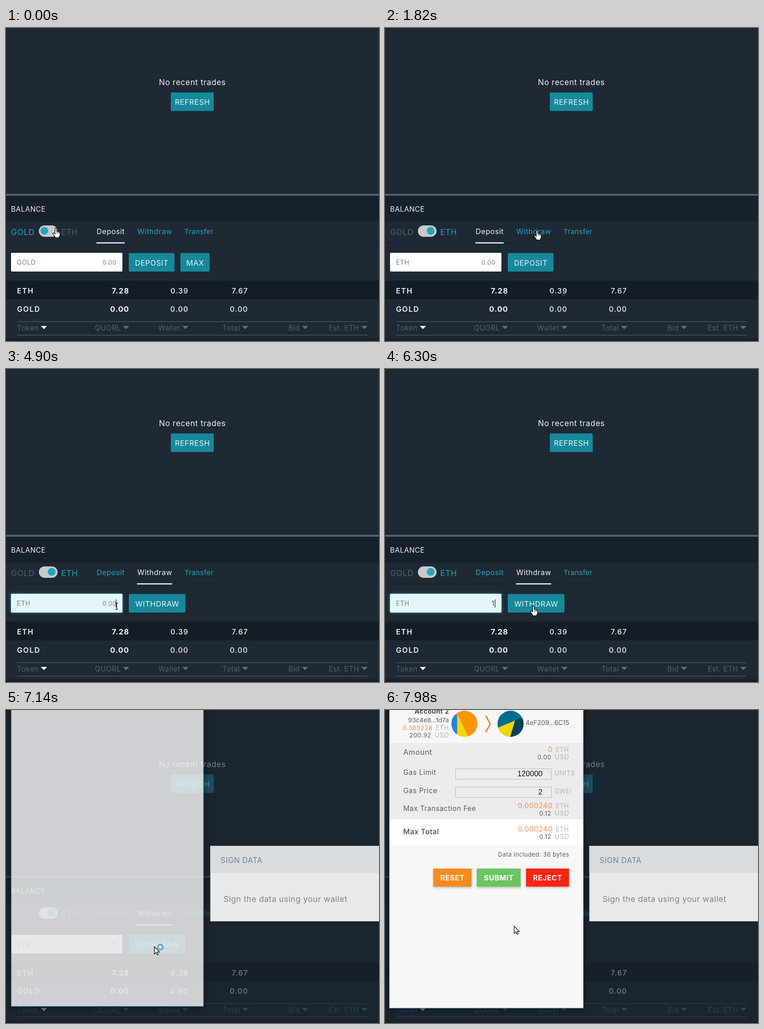
An HTML page with a canvas that plays this animation: 817 by 685 pixels, repeating every 8 s.

```html
<!DOCTYPE html>
<html lang="en">
<head>
<meta charset="utf-8">
<title>Token balance</title>
<style>
  html, body { margin: 0; width: 100%; height: 100%; overflow: hidden; background: #1e2934; }
  canvas { display: block; }
</style>
</head>
<body>
<canvas id="stage" width="817" height="685"></canvas>
<script>
const ctx = document.getElementById('stage').getContext('2d');
const LOOP = 8000, STEP = 140;
const BG = '#1e2934', DARK = '#16212b', TEAL = '#16899b', CYAN = '#22a5c4',
      MUTED = '#4d6270', LIGHT = '#eef2f4', RULE = '#4b606c';

// Times of the user's actions
const TOGGLE = 980, TAB = 2380, FOCUS = 3780, TYPED = 5740, SIGN = 6720,
      POPUP = 7140, LOADED = 7560;

const moves = [
  { from: 1120, to: 1820, a: [109, 437], b: [333, 442] },
  { from: 2800, to: 3220, a: [333, 442], b: [239, 512] },
  { from: 4060, to: 4480, a: [239, 512], b: [242, 519] },
  { from: 5740, to: 6300, a: [242, 519], b: [325, 518] },
  { from: 7700, to: 7980, a: [326, 518], b: [283, 473] }
];

const HAND = new Path2D('M-1.6 2Q0-1 1.8 2V8Q3.6 6.6 4.8 8.6Q6.5 7.4 7.5 9.4Q9.4 9 9.4 11.4V15' +
  'Q9 18 7.4 19.5V22H-1.6V20Q-4 17-6.5 13Q-5.4 10.5-3 12.6L-1.6 14Z');
const ARROW = new Path2D('M0 0V16L3.7 12.6L6.2 18L8.8 16.9L6.4 11.6H11.3Z');

function rect(x, y, w, h, color) {
  ctx.fillStyle = color;
  ctx.fillRect(x, y, w, h);
}

function round(x, y, w, h, r, color) {
  ctx.fillStyle = color;
  ctx.beginPath();
  ctx.roundRect(x, y, w, h, r);
  ctx.fill();
}

function disc(x, y, r, color) {
  ctx.fillStyle = color;
  ctx.beginPath();
  ctx.arc(x, y, r, 0, Math.PI * 2);
  ctx.fill();
}

function poly(points, color) {
  ctx.fillStyle = color;
  ctx.beginPath();
  points.forEach(([x, y]) => ctx.lineTo(x, y));
  ctx.closePath();
  ctx.fill();
}

function text(str, x, y, size, color, { align = 'left', weight = 400, gap = size * 0.035 } = {}) {
  ctx.font = `${weight} ${size}px Inter, sans-serif`;
  ctx.letterSpacing = gap + 'px';
  ctx.textAlign = align;
  ctx.fillStyle = color;
  // Half of the trailing gap keeps centred text centred
  ctx.fillText(str, x + (align === 'center' ? gap / 2 : 0), y);
}

const right = { align: 'right' }, center = { align: 'center' };

function button(label, x, y, w) {
  round(x, y, w, 40.5, 2, TEAL);
  text(label, x + w / 2, y + 27, 16.3, LIGHT, center);
}

function drawToggle(t) {
  const eth = t >= TOGGLE;
  text('GOLD', 11, 453, 17.5, eth ? MUTED : CYAN);
  text('ETH', 121, 453, 17.5, eth ? CYAN : MUTED);
  round(72, 432, 41, 25, 12.5, '#c9c9c7');
  const k = Math.min(1, Math.max(0, (t - TOGGLE + STEP) / (2 * STEP)));
  disc(84 + 16 * k, 444, 8.5, CYAN);
}

function drawTabs(active) {
  [['Deposit', 198, 62], ['Withdraw', 287, 77], ['Transfer', 391, 63]].forEach(([name, x, w], i) => {
    const on = i === active;
    text(name, x + w / 2, 451, i === 2 ? 15 : 16, on ? LIGHT : CYAN, center);
    if (on) rect(x, 469, w, 2.5, '#f4f6f6');
  });
}

function drawInput(t) {
  const focused = t >= FOCUS && t < SIGN;
  if (focused) {
    ctx.save();
    ctx.shadowColor = 'rgba(42,165,198,.6)';
    ctx.shadowBlur = 6;
    round(10.5, 491.5, 245, 42, 2.5, '#2a8ea6');
    ctx.restore();
  }
  round(11, 492, 244, 41, 2, focused ? '#e3f6f9' : '#ffffff');
  text(t >= TOGGLE ? 'ETH' : 'GOLD', 24, 518, 14, '#6b8088');
  if (t >= TYPED) text('1', 240, 518, 14.5, '#44545b', right);
  else text('0.00', 242, 518, 13.5, '#74868c', right);
  const caret = focused && (t < 4340 || (t >= 4760 && t < 5320) || t >= TYPED);
  if (caret) rect(240.5, 504, 1.2, 18, '#111');
}

function drawTable() {
  rect(0, 553, 817, 41, '#141d26');
  const number = (weight, gap) => ({ align: 'right', weight, gap });
  [['ETH', '7.28', '0.39', '7.67', 581], ['GOLD', '0.00', '0.00', '0.00', 621]].forEach(
    ([name, held, wallet, total, y]) => {
      text(name, 24, y, 16, LIGHT, { weight: 600, gap: 1.6 });
      text(held, 270, y, 16.5, LIGHT, number(700, 1));
      text(wallet, 400, y, 16, LIGHT, number(500, 1.3));
      text(total, 530.5, y, 16, LIGHT, number(500, 1.3));
    });
  rect(24, 642, 768, 1.2, RULE);
  rect(24, 671.5, 768, 1.2, RULE);
  [['Token', 71], ['QUORL', 251], ['Wallet', 381], ['Total', 512], ['Bid', 643], ['Est. ETH', 773]].forEach(
    ([name, x], i) => {
      text(name, x + 0.5, 662, 15.5, MUTED, right);
      poly([[x + 5, 652], [x + 19, 652], [x + 12, 659]], i ? '#5b717e' : '#ffffff');
    });
  rect(0, 679, 817, 6, DARK);
}

function drawPage(t) {
  rect(0, 0, 817, 685, BG);
  text('No recent trades', 408, 125, 17.3, LIGHT, center);
  button('REFRESH', 361, 141, 94);
  rect(0, 363, 817, 4, '#50656f');
  rect(0, 367, 817, 57, DARK);
  text('BALANCE', 11, 402, 15.4, LIGHT);
  rect(0, 469.5, 817, 1.5, '#17222c');
  drawToggle(t);
  drawTabs(t >= TAB ? 1 : 0);
  drawInput(t);
  if (t >= TAB) button('WITHDRAW', 269, 492.5, 124);
  else button('DEPOSIT', 269, 492.5, 100);
  if (t < TOGGLE) button('MAX', 382, 492.5, 64);
  drawTable();
}

function drawSignBox(t) {
  ctx.save();
  ctx.globalAlpha = t < SIGN + STEP ? 0.5 : 1;
  rect(0, 0, 817, 685, 'rgba(26,35,46,.56)');
  ctx.shadowColor = 'rgba(0,0,0,.4)';
  ctx.shadowBlur = 5;
  rect(447.5, 297.5, 380, 165, '#e9e9e9');
  ctx.shadowColor = 'transparent';
  rect(447.5, 297.5, 380, 59, '#d8dcdf');
  text('SIGN DATA', 470, 335, 16.6, '#70889a');
  text('Sign the data using your wallet', 476.5, 420, 17.4, '#70889a');
  ctx.restore();
}

function badge(x, y, base, parts) {
  ctx.save();
  ctx.beginPath();
  ctx.arc(x, y, 28.5, 0, Math.PI * 2);
  ctx.clip();
  rect(x - 29, y - 29, 58, 58, base);
  parts.forEach(([color, points]) => poly(points, color));
  ctx.restore();
}

const INK = '#5c5c5c', ORANGE = '#f0935a', UNIT = '#b6b6b6';

function amount(eth, usd, edge, y, size = 15.5) {
  text(eth, edge - 36, y, size, ORANGE, right);
  text('ETH', edge, y, 14, UNIT, right);
  text(usd, edge - 38.5, y + 16, 13.5, INK, right);
  text('USD', edge + 0.5, y + 16, 14.5, UNIT, right);
}

function field(value, unit, y) {
  ctx.strokeStyle = '#b9b9b9';
  ctx.lineWidth = 1;
  ctx.strokeRect(154.5, y + 0.5, 210, 23);
  ctx.font = '16.5px "Liberation Sans", sans-serif';
  ctx.letterSpacing = '0px';
  ctx.textAlign = 'right';
  ctx.fillStyle = '#111';
  ctx.fillText(value, 345, y + 17);
  text(unit, 371, y + 15, 14, UNIT);
}

function drawPayment() {
  rect(10, 72, 424, 167, '#ececec');
  rect(10, 239, 424, 57, '#ffffff');
  text('Account 2', 140.5, 8, 14.3, '#4d4d4d', { align: 'right', weight: 700 });
  text('93c4e8...1d7a', 140, 27, 13.7, INK, { align: 'right', gap: 0 });
  amount('0.389228', '200.92', 140, 44, 13.5);
  badge(174, 30, '#f99500', [
    ['#f4d800', [[158, 8], [183, 60], [158, 60]]],
    ['#2a80e0', [[144, 12], [158, 10], [158, 52], [144, 52]]]
  ]);
  badge(275, 30, '#046d8b', [
    ['#f2d600', [[244, 40], [285, 23], [274, 62], [244, 62]]],
    ['#0a4059', [[285, 23], [306, 15], [306, 62], [273, 62]]]
  ]);
  ctx.strokeStyle = '#f5842c';
  ctx.lineWidth = 3;
  ctx.beginPath();
  ctx.moveTo(220.5, 12);
  ctx.lineTo(230.5, 30.5);
  ctx.lineTo(220.5, 49);
  ctx.stroke();
  text('4eF209...6C15', 308, 33, 14, INK, { gap: 0 });

  text('Amount', 40, 98, 16.3, INK);
  amount('0', '0.00', 403, 91.5);
  text('Gas Limit', 40, 142, 15.4, INK);
  field('120000', 'UNITS', 128);
  text('Gas Price', 40, 182, 15.4, INK);
  field('2', 'GWEI', 168);
  text('Max Transaction Fee', 40, 221, 15.2, INK);
  amount('0.000240', '0.12', 403, 215);
  text('Max Total', 40, 272, 15.8, '#444', { weight: 500 });
  amount('0.000240', '0.12', 403, 265.5);
  text('Data included: 36 bytes', 403.5, 321, 13, INK, right);

  [['RESET', 105.5, 84, '#f98a1f'], ['SUBMIT', 201, 96, '#6cc462'], ['REJECT', 309, 94, '#ff2412']].forEach(
    ([label, x, w, color]) => {
      ctx.save();
      ctx.shadowColor = 'rgba(0,0,0,.25)';
      ctx.shadowBlur = 5;
      ctx.shadowOffsetY = 2;
      rect(x, 347, w, 39.5, color);
      ctx.restore();
      text(label, x + w / 2, 373, 15.7, '#fff', { align: 'center', weight: 700 });
    });
}

function drawPopup(t) {
  const opening = t < POPUP + STEP;
  const inset = opening ? 2 : 0;
  const x = 9 + inset, top = -20, w = 426 - inset * 2, h = 673 - inset * 2;
  ctx.save();
  ctx.shadowColor = 'rgba(0,0,0,.45)';
  ctx.shadowBlur = 14;
  ctx.shadowOffsetY = 3;
  rect(x, top, w, h, '#f7f7f7');
  ctx.restore();

  if (opening) {
    // The window fades in over the page before it was dimmed
    ctx.save();
    ctx.beginPath();
    ctx.rect(x, top, w, h);
    ctx.clip();
    drawPage(t);
    rect(x, top, w, h, 'rgba(229,230,231,.89)');
    ctx.restore();
  }
  if (t >= LOADED) drawPayment();
  ctx.strokeStyle = '#3a93bd';
  ctx.lineWidth = 1.2;
  ctx.strokeRect(x + 0.5, top, w - 1, h - 0.5);
}

function pointerAt(t) {
  const move = moves.filter(m => t >= m.from).pop();
  if (!move) return moves[0].a;
  const p = Math.min(1, (t - move.from) / (move.to - move.from));
  const ease = p * p * (3 - 2 * p);
  return move.a.map((v, i) => v + (move.b[i] - v) * ease);
}

function pointerKind(x, y, t) {
  if (t >= SIGN + STEP) return 'arrow';
  const inside = (l, top, r, b) => x >= l && x <= r && y >= top && y <= b;
  if (inside(11, 492, 255, 533)) return 'beam';
  const active = inside(72, 432, 113, 457) || inside(198, 430, 260, 470) ||
    inside(287, 430, 364, 470) || inside(269, 492, t >= TAB ? 393 : 369, 533);
  return active ? 'hand' : 'arrow';
}

function drawPointer(t) {
  const [x, y] = pointerAt(t);
  const kind = pointerKind(x, y, t);
  ctx.save();
  ctx.translate(x, y);
  if (kind === 'beam') {
    rect(-0.1, -7, 1.2, 14, '#111');
    rect(-2.5, -7.5, 6, 1.2, '#111');
    rect(-2.5, 6.5, 6, 1.2, '#111');
  } else {
    const shape = kind === 'hand' ? HAND : ARROW;
    ctx.fillStyle = '#fff';
    ctx.strokeStyle = '#0b0f13';
    ctx.lineWidth = 1.3;
    ctx.fill(shape);
    ctx.stroke(shape);
    if (kind === 'hand') [2, 4.8, 7.4].forEach(dx => rect(dx, 9, 0.9, 4, '#0b0f13'));
  }
  if (t >= POPUP && t < LOADED) {
    ctx.strokeStyle = '#569fd3';
    ctx.lineWidth = 3.2;
    ctx.beginPath();
    ctx.arc(13, 1, 5.6, 0, Math.PI * 2);
    ctx.stroke();
  }
  ctx.restore();
}

function draw(now) {
  const t = Math.floor((now % LOOP) / STEP) * STEP;
  drawPage(t);
  if (t >= SIGN) drawSignBox(t);
  if (t >= POPUP) drawPopup(t);
  if (t >= POPUP && t < POPUP + STEP) {
    // The sign box stays above the fading page edge
    ctx.globalAlpha = 1;
  }
  drawPointer(t);
}

const start = performance.now();
function tick() {
  draw(performance.now() - start);
  requestAnimationFrame(tick);
}
tick();
</script>
</body>
</html>
```
